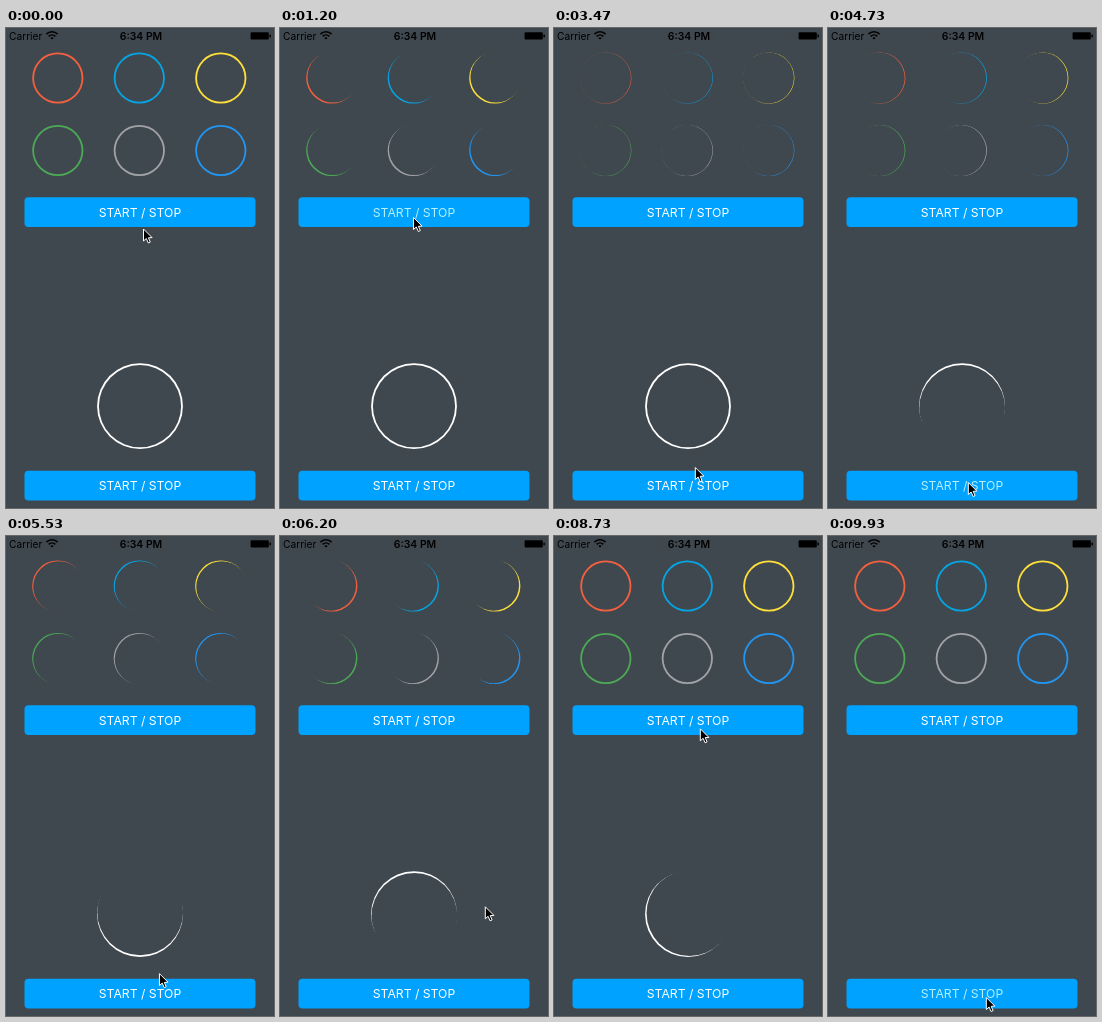
An HTML page with a canvas that plays this animation: 268x480 px, repeating every 9990 ms.

```html
<!DOCTYPE html>
<html lang="en">
<head>
<meta charset="utf-8">
<style>
html, body { margin: 0; width: 100%; height: 100%; overflow: hidden; background: #40484f; }
canvas { display: block; width: 268px; height: 480px; }
</style>
</head>
<body>
<canvas id="stage"></canvas>
<script>
const LOOP = 9990, WIDTH = 268, HEIGHT = 480;
const TAU = Math.PI * 2;
const BACK = '#40484f', INK = '#000', LINE = 1.8;
const canvas = document.getElementById('stage');
const ctx = canvas.getContext('2d');
const scale = window.devicePixelRatio || 1;
canvas.width = WIDTH * scale;
canvas.height = HEIGHT * scale;

const colors = ['#f4603f', '#05a5e4', '#ffe03b', '#4caa55', '#a2a3a8', '#2196f3'];

// Each pair of clicks starts and stops a group; angles are turns from 3 o'clock.
const small = {
  clicks: [950, 7400], period: 1350, turn: .5,
  depth: t => .4 + 1.2 * Math.sin(Math.PI * (t - 3900) / 5000) ** 2
};
const big = { clicks: [4500, 9800], period: 1500, turn: .58, depth: () => 1.8 };

// Places where the pointer comes to rest, with the time of arrival.
const stops = [
  { at: 0, x: 137.5, y: 201 },
  { at: 900, x: 133.5, y: 189.5 },
  { at: 3450, x: 141.3, y: 439.5 },
  { at: 4400, x: 140.3, y: 454.5 },
  { at: 6100, x: 205.3, y: 370.8 },
  { at: 7300, x: 146.3, y: 192.8 },
  { at: 9700, x: 158.3, y: 461.5 }
];
const MOVE = 800;

const clamp = x => Math.min(1, Math.max(0, x));
const smooth = x => x * x * (3 - 2 * x);

function pointerAt(t) {
  let { x, y } = stops[0];
  for (const stop of stops.slice(1)) {
    const k = smooth(clamp((t - stop.at + MOVE) / MOVE));
    x += (stop.x - x) * k;
    y += (stop.y - y) * k;
  }
  return [x, y];
}

function disc(x, y, r, color) {
  ctx.fillStyle = color;
  ctx.beginPath();
  ctx.arc(x, y, r, 0, TAU);
  ctx.fill();
}

// A disc under a shifted cover leaves a turning crescent and a faint rim.
function spinner(x, y, r, color, group, t) {
  const [start, stop] = group.clicks;
  disc(x, y, r, color);
  if (t < start || t >= stop) {
    disc(x, y, r - LINE, BACK);
    return;
  }
  const angle = TAU * (t / group.period + group.turn);
  const shift = group.depth(t);
  disc(x - shift * Math.cos(angle), y - shift * Math.sin(angle), r, BACK);
}

function text(label, x, y, font, color, align) {
  ctx.font = font + ' Inter, sans-serif';
  ctx.fillStyle = color;
  ctx.textAlign = align;
  ctx.fillText(label, x, y);
}

function box(x, y, w, h, r, color) {
  ctx.fillStyle = color;
  ctx.beginPath();
  ctx.roundRect(x, y, w, h, r);
  ctx.fill();
}

function button(y, group, t) {
  const pressed = group.clicks.some(click => t >= click && t < click + 300);
  box(18.5, y, 231, 29.8, 4, '#00a2ff');
  text('START / STOP', 134, y + 19.5, '400 12.2px', pressed ? '#b4f0f8' : '#fff', 'center');
}

function statusBar() {
  text('Carrier', 3, 11.7, '400 10.2px', INK, 'left');
  text('6:34 PM', 135, 11.7, '600 10.4px', INK, 'center');
  ctx.strokeStyle = INK;
  ctx.lineWidth = 1.6;
  for (const r of [1.5, 4.7, 7.9]) {
    ctx.beginPath();
    ctx.arc(46, 11.7, r, TAU * .625, TAU * .875);
    ctx.stroke();
  }
  box(244.6, 4.2, 18.2, 7.4, 1, INK);
  box(263.4, 6.4, 1.5, 3, .6, INK);
}

function pointer(x, y) {
  ctx.beginPath();
  ctx.moveTo(x, y);
  ctx.lineTo(x, y + 12);
  ctx.lineTo(x + 2.8, y + 9.5);
  ctx.lineTo(x + 4.8, y + 14);
  ctx.lineTo(x + 6.8, y + 13.1);
  ctx.lineTo(x + 4.9, y + 8.8);
  ctx.lineTo(x + 8.6, y + 8.6);
  ctx.closePath();
  ctx.fillStyle = '#000';
  ctx.fill();
  ctx.strokeStyle = '#fff';
  ctx.lineWidth = 1;
  ctx.lineJoin = 'round';
  ctx.stroke();
}

function draw(t) {
  ctx.setTransform(scale, 0, 0, scale, 0, 0);
  ctx.fillStyle = BACK;
  ctx.fillRect(0, 0, WIDTH, HEIGHT);
  statusBar();
  colors.forEach((color, i) => {
    const column = i % 3, row = Math.floor(i / 3);
    spinner(51.8 + 81.5 * column, 50 + 72.5 * row, 25.6, color, small, t);
  });
  if (t < big.clicks[1]) spinner(134, 378.2, 42.9, '#fff', big, t);
  button(169.3, small, t);
  button(442.8, big, t);
  pointer(...pointerAt(t));
}

const began = performance.now();
function tick() {
  draw((performance.now() - began) % LOOP);
  requestAnimationFrame(tick);
}
tick();
</script>
</body>
</html>
```
